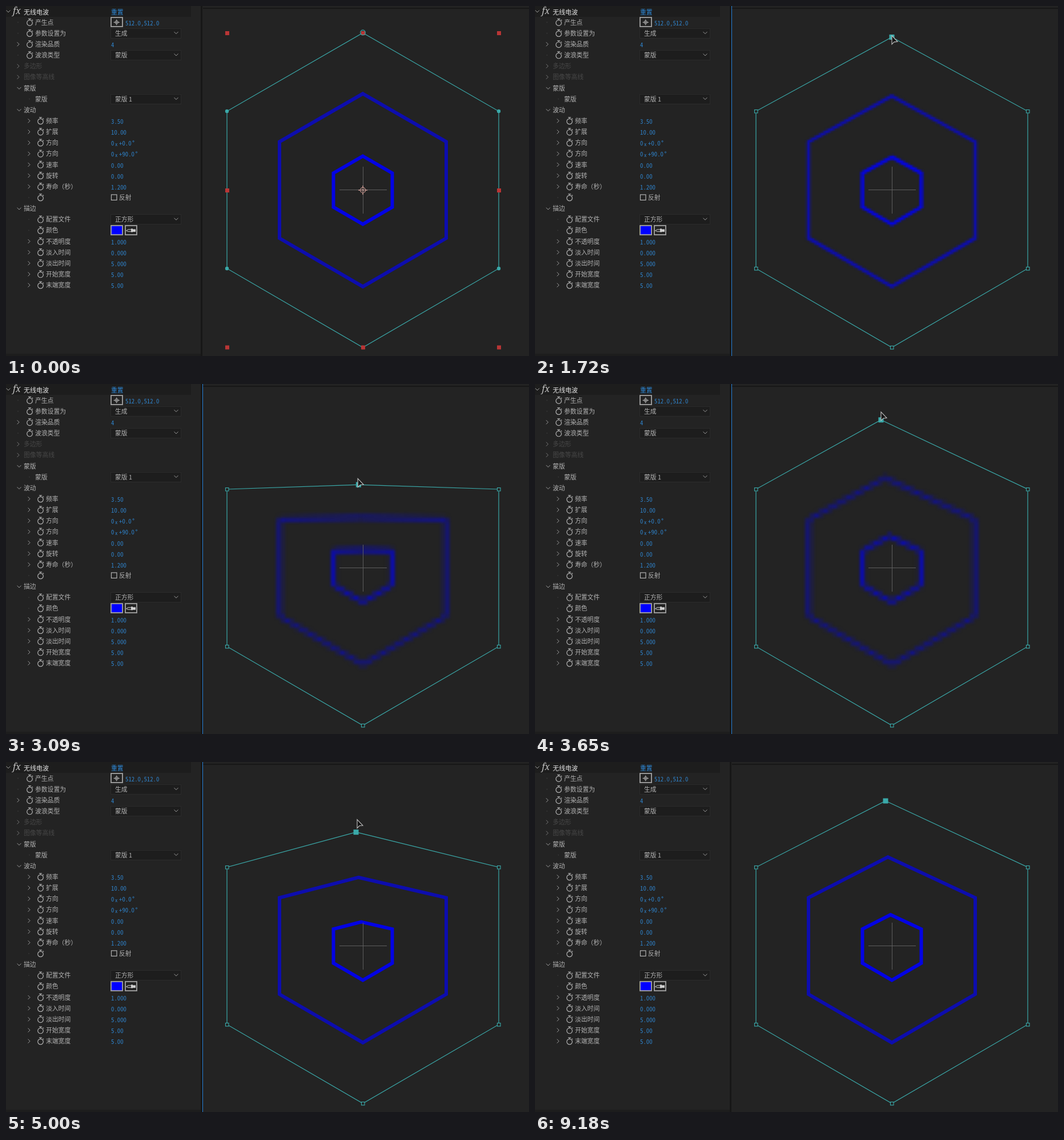
An HTML page with a canvas that plays this animation: 916 px wide and 612 px high, repeating every 9220 ms.

```html
<!DOCTYPE html>
<html lang="zh">
<head>
<meta charset="utf-8">
<title>无线电波</title>
<style>
html, body { margin: 0; width: 100%; height: 100%; overflow: hidden; background: #232323; }
canvas { display: block; }
</style>
</head>
<body>
<canvas id="stage" width="916" height="612"></canvas>
<script>
const W = 916, H = 612, LOOP = 9220;
const CX = 625, CY = 322, VIEW = 512;
const TEAL = '#3aa9a9', RED = '#b93535', GREY = '#b2b2b2', BLUE = '#2f83cb';
const CJK = '"Noto Sans CJK SC", "Noto Sans CJK", sans-serif';
const MONO = '"Noto Sans Mono CJK SC", "Liberation Mono", monospace';
const ctx = document.getElementById('stage').getContext('2d');

function layer(w, h) {
  const c = document.createElement('canvas');
  c.width = w;
  c.height = h;
  return c.getContext('2d');
}

function path(g, pts, close) {
  g.beginPath();
  pts.forEach(([x, y]) => g.lineTo(x, y));
  if (close) g.closePath();
}

function line(g, color, width, pts, close) {
  g.strokeStyle = color;
  g.lineWidth = width;
  path(g, pts, close);
  g.stroke();
}

function ring(g, color, x, y, r, width) {
  g.strokeStyle = color;
  g.lineWidth = width;
  g.beginPath();
  g.arc(x, y, r, 0, 7);
  g.stroke();
}

function box(g, color, x, y, w, h, width = 1) {
  g.strokeStyle = color;
  g.lineWidth = width;
  g.strokeRect(x, y, w, h);
}

function square(g, color, x, y, size) {
  g.fillStyle = color;
  g.fillRect(x - size / 2, y - size / 2, size, size);
}

// ---- effect panel ----
const panel = layer(342, H);

function text(str, x, y, color = GREY, font = '10.8px ' + CJK) {
  panel.font = font;
  panel.fillStyle = color;
  panel.fillText(str, x, y);
}

const value = (str, x, y) => text(str, x, y + 1, BLUE, '10.8px ' + MONO);

function chevron(x, y, down, color = '#9a9a9a') {
  line(panel, color, 1, down
    ? [[x - 3.5, y - 1.5], [x, y + 2], [x + 3.5, y - 1.5]]
    : [[x - 1.5, y - 3.5], [x + 2, y], [x - 1.5, y + 3.5]]);
}

function watch(x, y) {
  ring(panel, GREY, x, y + 1, 4.8, 1.2);
  line(panel, GREY, 1.2, [[x - 2.5, y - 6], [x + 2.5, y - 6]]);
  line(panel, GREY, 1.2, [[x, y - 6], [x, y - 4]]);
  line(panel, GREY, 1.2, [[x + 4, y - 4.5], [x + 5.5, y - 3]]);
}

function dropdown(str, y) {
  panel.fillStyle = '#1d1d1d';
  panel.fillRect(184, y - 9, 123, 17);
  box(panel, '#2b2b2b', 183.5, Math.round(y - 9) + 0.5, 123, 17);
  text(str, 191, y);
  chevron(298, y - 1, true);
}

function angle(str, y) {
  value('0', 184, y);
  text('x', 191, y + 2, BLUE, '9px ' + MONO);
  value(str, 198, y);
  ring(panel, BLUE, 201.5 + str.length * 5.4, y - 2.5, 1.2, 0.8);
}

const frame = (x, y) => box(panel, '#a4a4a4', x, Math.floor(y) - 8, 20, 16, 1.8);

function pointButton(y) {
  frame(184, y);
  ring(panel, GREY, 193.7, y, 2.8, 1);
  line(panel, GREY, 1, [[188.5, y], [199, y]]);
  line(panel, GREY, 1, [[193.7, y - 5], [193.7, y + 5]]);
  value('512.0,512.0', 209, y);
}

function checkbox(y) {
  box(panel, GREY, 184.5, y - 5, 9.5, 9.5, 1.2);
  text('反射', 198, y);
}

function swatch(y) {
  panel.fillStyle = '#0000ff';
  panel.fillRect(184, Math.floor(y) - 8, 20, 16);
  frame(184, y);
  frame(209, y);
  line(panel, '#d0d0d0', 1, [[210.5, y + 0.5], [214, y - 1.5], [220, y - 1.5], [220, y + 2], [214, y + 2]], true);
  panel.fillStyle = '#d0d0d0';
  panel.fillRect(219, y - 3, 3, 6);
  panel.fillRect(221, y - 2, 6, 4.5);
}

// Each row: kind (indent level and lead mark), label, control, argument
const ROWS = [
  ['1.', '产生点', pointButton],
  ['1.', '参数设置为', dropdown, '生成'],
  ['1>', '渲染品质', value, '4'],
  ['1.', '波浪类型', dropdown, '蒙版'],
  ['0x', '多边形'],
  ['0x', '图像等高线'],
  ['0v', '蒙版'],
  ['1-', '蒙版', dropdown, '蒙版 1'],
  ['0v', '波动'],
  ['2>', '频率', value, '3.50'],
  ['2>', '扩展', value, '10.00'],
  ['2>', '方向', angle, '+0.0'],
  ['2>', '方向', angle, '+90.0'],
  ['2>', '速率', value, '0.00'],
  ['2>', '旋转', value, '0.00'],
  ['2>', '寿命（秒）', value, '1.200'],
  ['2.', '', checkbox],
  ['0v', '描边'],
  ['2.', '配置文件', dropdown, '正方形'],
  ['2.', '颜色', swatch],
  ['2>', '不透明度', value, '1.000'],
  ['2>', '淡入时间', value, '0.000'],
  ['2>', '淡出时间', value, '5.000'],
  ['2>', '开始宽度', value, '5.00'],
  ['2>', '末端宽度', value, '5.00']
];

function drawRow([kind, label, control, arg], i) {
  const y = 28.5 + 19.15 * i, level = +kind[0], mark = kind[1];
  const x = level === 2 ? 40 : mark === '-' ? 41 : 21;
  if (mark === 'v') chevron(23, y, true);
  else if (mark === '>') chevron(x, y, false);
  else if (mark === 'x') chevron(x, y, false, '#777');
  else square(panel, '#3c3c3c', x, y, 1.5);
  if (level && mark !== '-') watch(level === 2 ? 60.5 : 41.5, y);
  text(label, [31, 51, 70][level], y, mark === 'x' ? '#484848' : GREY);
  if (control === value) value(arg, 184, y);
  else if (control) arg ? control(arg, y) : control(y);
}

function drawPanel() {
  panel.fillStyle = '#232323';
  panel.fillRect(0, 0, 342, H);
  panel.fillStyle = '#1d1d1d';
  panel.fillRect(0, 0, 324, 19);
  panel.fillRect(0, 608, 342, 4);
  panel.textBaseline = 'middle';
  chevron(4, 9, true);
  text('fx', 12, 9, '#c0c0c0', 'italic 16px "Noto Serif", "Liberation Serif", serif');
  text('无线电波', 31, 10.5, '#e2e2e2', '500 11px ' + CJK);
  text('重置', 184, 10.5, '#2f8ee0', '500 10.8px ' + CJK);
  ROWS.forEach(drawRow);
}

// ---- motion ----
const KEYS = [
  [30, 491, 604], [230, 590, 430], [480, 672, 205], [780, 625, 43],
  [1300, 625, 43], [1750, 625, 53], [2160, 624, 121], [2200, 624, 131],
  [2400, 622, 172], [2670, 620, 185], [2900, 620, 185], [3300, 610, 125],
  [3610, 606, 59], [3650, 606, 49], [3790, 607, 42], [3850, 607, 42],
  [4250, 609, 80], [4650, 611, 125], [4935, 611, 125], [4960, 613, 119],
  [5000, 615, 101], [5090, 614, 64], [5250, 614, 64], [5670, 672, 468],
  [5720, 673, 470], [6030, 766, 614]
];

const slope = (i, k) => (KEYS[i + 1][k] - KEYS[i][k]) / (KEYS[i + 1][0] - KEYS[i][0]);

// Monotone tangent: flat at turning points, harmonic mean elsewhere
function tangent(i, k) {
  if (i === 0) return slope(0, k);
  if (i === KEYS.length - 1) return slope(i - 1, k);
  const a = slope(i - 1, k), b = slope(i, k);
  return a * b <= 0 ? 0 : 2 * a * b / (a + b);
}

function pointer(t) {
  const last = KEYS.length - 1;
  if (t <= KEYS[0][0]) return KEYS[0].slice(1);
  if (t >= KEYS[last][0]) return KEYS[last].slice(1);
  const i = KEYS.findIndex(key => key[0] > t) - 1;
  const span = KEYS[i + 1][0] - KEYS[i][0], u = (t - KEYS[i][0]) / span, v = 1 - u;
  return [1, 2].map(k =>
    v * v * (1 + 2 * u) * KEYS[i][k] + u * u * (3 - 2 * u) * KEYS[i + 1][k] +
    span * u * v * (v * tangent(i, k) - u * tangent(i + 1, k)));
}

// The dragged vertex trails the pointer by a short delay
function apex(t, lag) {
  const [x, y] = pointer(Math.min(5200, Math.max(1300, t - lag)));
  return [x, y + 4];
}

const hexagon = top => [top, [863, 184], [863, 459], [625, 597], [387, 459], [387, 184]];

// Preview block size: coarse while dragging
function quality(t) {
  if (t < 1330 || t >= 5200) return 1;
  if (t < 2240) return 4;
  if (t < 2670) return 8;
  if (t < 2900) return 1;
  if (t < 3820) return 8;
  if (t < 4690) return 4;
  return t < 5040 ? 1 : 4;
}

// ---- viewport ----
function drawWaves(g, top) {
  for (const [scale, color] of [[0.6134, '#0d0dae'], [0.2164, '#0303e4']]) {
    const pts = hexagon(top).map(([x, y]) => [CX + (x - CX) * scale, CY + (y - CY) * scale]);
    line(g, color, 6, pts, true);
  }
}

function waves(t) {
  const top = apex(t, 50), q = quality(t);
  if (q === 1) return drawWaves(ctx, top);
  const x = CX - VIEW / 2, y = CY - VIEW / 2, low = layer(VIEW / q, VIEW / q);
  low.scale(1 / q, 1 / q);
  low.translate(-x, -y);
  drawWaves(low, top);
  ctx.save();
  ctx.imageSmoothingEnabled = false;
  ctx.filter = `blur(${q / 4}px)`;
  ctx.drawImage(low.canvas, x, y, VIEW, VIEW);
  ctx.restore();
}

function crosshair() {
  line(ctx, '#5e5e5e', 1, [[584, 321.5], [667, 321.5]]);
  line(ctx, '#5e5e5e', 1, [[625.5, 281], [625.5, 363]]);
}

function anchor() {
  const c = '#e0a8a0';
  ring(ctx, c, 625, 322, 4.5, 1.2);
  ring(ctx, c, 625, 322, 1.8, 1);
  for (const [dx, dy] of [[1, 0], [-1, 0], [0, 1], [0, -1]])
    line(ctx, c, 1.2, [[625 + dx * 4, 322 + dy * 4], [625 + dx * 8, 322 + dy * 8]]);
}

function outline(t, dragging) {
  const pts = hexagon(apex(t, 40));
  line(ctx, TEAL, 1.2, pts, true);
  if (dragging) {
    pts.slice(1).forEach(([x, y]) => {
      square(ctx, '#232323', x, y + 0.5, 6);
      box(ctx, TEAL, x - 2.5, y - 2.5, 5.5, 5.5, 1.1);
    });
    square(ctx, TEAL, pts[0][0], pts[0][1], 9);
    return;
  }
  ctx.fillStyle = TEAL;
  pts.slice(1).forEach(([x, y]) => {
    ctx.beginPath();
    ctx.arc(x, y, 3.2, 0, 7);
    ctx.fill();
  });
  for (const x of [387.5, 625.5, 863.5])
    for (const y of [47.5, 322.5, 597])
      if (x !== 625.5 || y !== 322.5) square(ctx, RED, x, y, 7);
  ring(ctx, TEAL, 625, 46.5, 4.3, 1.2);
}

function cursor(t) {
  if (t < 30 || t >= 6030) return;
  const [x, y] = pointer(t);
  path(ctx, [[x, y], [x, y + 15], [x + 4, y + 11], [x + 10, y + 10.5]], true);
  ctx.fillStyle = '#161616';
  ctx.fill();
  ctx.strokeStyle = '#c4c4c4';
  ctx.lineWidth = 1.1;
  ctx.stroke();
}

function draw(t) {
  const dragging = t >= 1300;
  ctx.fillStyle = '#232323';
  ctx.fillRect(0, 0, W, H);
  ctx.drawImage(panel.canvas, 0, 0);
  ctx.fillStyle = '#171717';
  ctx.fillRect(341, 0, 3, H);
  ctx.fillRect(345, 3, W - 345, 2);
  if (dragging && t < 9180) {
    ctx.fillStyle = '#2680d8';
    ctx.fillRect(344, 0, 1, H);
  }
  waves(t);
  crosshair();
  outline(t, dragging);
  if (!dragging) anchor();
  cursor(t);
}

drawPanel();
const start = performance.now();
function tick() {
  draw((performance.now() - start) % LOOP);
  requestAnimationFrame(tick);
}
tick();
</script>
</body>
</html>
```
